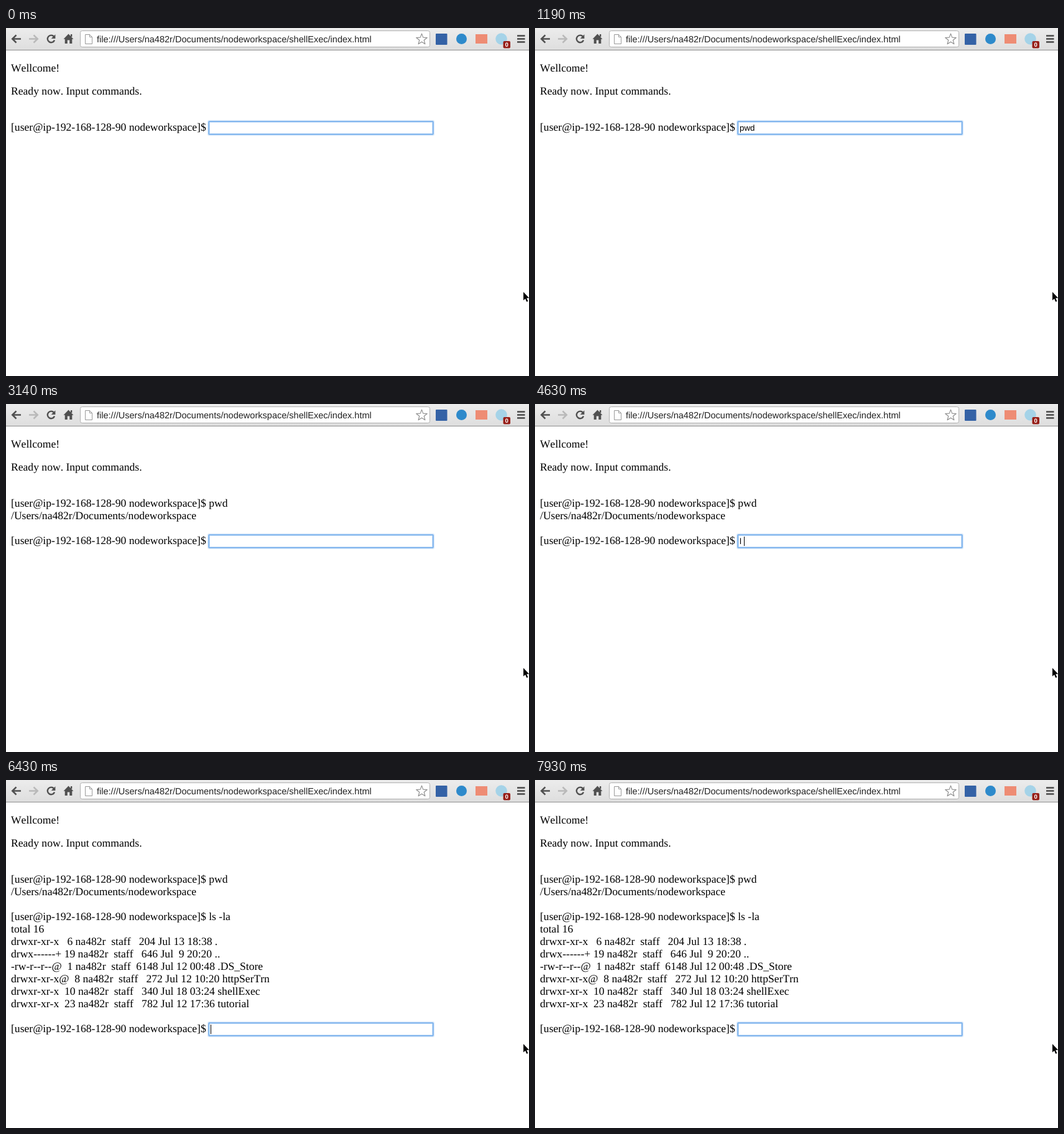
Animation of 841x559 px, one loop 8000 ms. Source, as an HTML page:

```html
<!DOCTYPE html>
<html lang="en">
<head>
<meta charset="utf-8">
<title>Browser shell</title>
<style>
  html, body { margin: 0; width: 100%; height: 100%; overflow: hidden; background: #fff; }
  svg { display: block; }
  text { white-space: pre; font-kerning: none; font-variant-ligatures: none; text-rendering: geometricPrecision; }
  .page { font: 17.6px "Liberation Serif", "Times New Roman", serif; }
  .sans { font-family: "Liberation Sans", Arial, sans-serif; }
</style>
</head>
<body>
<svg width="841" height="559" viewBox="0 0 841 559">
  <defs>
    <linearGradient id="bar" x2="0" y2="1">
      <stop offset="0" stop-color="#ececec"/>
      <stop offset="1" stop-color="#dedede"/>
    </linearGradient>
  </defs>
  <rect width="841" height="559" fill="#fff"/>

  <!-- toolbar -->
  <rect width="841" height="35" fill="url(#bar)"/>
  <rect y="35" width="841" height="1" fill="#8e8e8e"/>
  <rect x="119.5" y="4.5" width="562" height="26" rx="3" fill="#fff" stroke="#b0b0b0"/>
  <g id="arrow" fill="none" stroke="#505050" stroke-width="2.6">
    <path d="M24 17.5H11M16.5 11.3L10.3 17.5L16.5 23.7"/>
  </g>
  <path d="M37 17.5H50M44.5 11.3L50.7 17.5L44.5 23.7" fill="none" stroke="#b9b9b9" stroke-width="2.6"/>
  <path d="M77 13.6A5.8 5.8 0 1 0 78 19.5" fill="none" stroke="#505050" stroke-width="2.4"/>
  <path d="M79.4 10.3V17H72.7Z" fill="#505050"/>
  <path d="M100.5 9.5L108.5 17.8H106.3V25H102.3V19.5H98.7V25H94.7V17.8H92.5ZM104 10H106.3V14H104Z" fill="#505050"/>
  <path d="M127.5 10.5H134.5L138.5 14.5V25.5H127.5ZM134.5 10.5V14.5H138.5" fill="#fff" stroke="#9a9a9a"/>
  <text class="sans" x="146" y="23" font-size="14.54" fill="#222">file:///Users/na482r/Documents/nodeworkspace/shellExec/index.html</text>
  <path id="star" fill="#fff" stroke="#8c8c8c" stroke-width="1.1" stroke-linejoin="round"/>

  <!-- extension buttons -->
  <rect x="691" y="9" width="18.5" height="18" rx="1" fill="#3462a6"/>
  <circle cx="732.5" cy="17.5" r="8.5" fill="#2e8acb"/>
  <rect x="755" y="10" width="19" height="15" fill="#ee8c74"/>
  <circle cx="796.5" cy="17.5" r="9.3" fill="#a5d3e8"/>
  <rect x="799.5" y="21" width="11.5" height="11.5" rx="2" fill="#97201a"/>
  <text class="sans" x="805.2" y="30.3" font-size="9.5" font-weight="bold" fill="#fff" text-anchor="middle">0</text>
  <path d="M822 12.5H834.5M822 17.5H834.5M822 22.5H834.5" stroke="#484848" stroke-width="2.6"/>

  <g id="lines" class="page"></g>

  <g id="field">
    <rect x="326" y="150" width="361" height="21" fill="#fff"/>
    <g id="ring" fill="none" stroke="#5b9fe8"></g>
    <text id="typed" class="sans" x="329" y="165" font-size="13.33"></text>
    <rect id="caret" y="153" width="1" height="15"/>
  </g>

  <path d="M832 424V437.5L835 434.7L837.2 439.8L839.4 438.9L837.2 433.8H841.4Z" stroke="#fff" stroke-width="1.6" paint-order="stroke"/>
</svg>
<script>
const LOOP = 8000;
const PROMPT = "[user@ip-192-168-128-90 nodeworkspace]$ ";
const INTRO = [[70, "Wellcome!"], [107, "Ready now. Input commands."]];
const SESSIONS = [
  [PROMPT + "pwd", "/Users/na482r/Documents/nodeworkspace", ""],
  [PROMPT + "ls -la", "total 16",
    "drwxr-xr-x   6 na482r  staff   204 Jul 13 18:38 .",
    "drwx------+ 19 na482r  staff   646 Jul  9 20:20 ..",
    "-rw-r--r--@  1 na482r  staff  6148 Jul 12 00:48 .DS_Store",
    "drwxr-xr-x@  8 na482r  staff   272 Jul 12 10:20 httpSerTrn",
    "drwxr-xr-x  10 na482r  staff   340 Jul 18 03:24 shellExec",
    "drwxr-xr-x  23 na482r  staff   782 Jul 12 17:36 tutorial", ""]
];
// start time, finished commands, typed text, caret shown
const STEPS = [
  [0, 0, "", 0], [300, 0, "p", 1], [440, 0, "pw", 1], [590, 0, "pwd", 1], [1190, 0, "pwd", 0],
  [1640, 1, "", 1], [2240, 1, "", 0], [2690, 1, "", 1], [3140, 1, "", 0],
  [3580, 1, "l", 1], [3880, 1, "l ", 1], [4180, 1, "l -", 1], [4630, 1, "l ", 1], [4780, 1, "l", 1],
  [5080, 1, "ls", 1], [5230, 1, "ls ", 1], [5530, 1, "ls -", 1], [5830, 1, "ls -l", 1], [5980, 1, "ls -la", 1],
  [6430, 2, "", 1], [6880, 2, "", 0], [7480, 2, "", 1], [7930, 2, "", 0]
];
// the caret moves by whole pixels
const ADVANCE = { p: 8, w: 9, d: 8, l: 3, s: 6, a: 7, " ": 4, "-": 5 };

const $ = id => document.getElementById(id);

function add(parent, tag, attrs, text = "") {
  const el = document.createElementNS("http://www.w3.org/2000/svg", tag);
  for (const key in attrs) el.setAttribute(key, attrs[key]);
  el.textContent = text;
  parent.append(el);
}

function drawRing() {
  [0.04, 0.2, 0.62, 0.85, 0.32].forEach((opacity, i) => {
    const out = 2.5 - i;
    add($("ring"), "rect", {
      x: 326 - out, y: 150 - out, width: 361 + 2 * out, height: 21 + 2 * out,
      rx: Math.max(0, out + 0.5), "stroke-opacity": opacity
    });
  });
}

function drawStar() {
  const points = Array.from({ length: 10 }, (_, i) => {
    const r = i % 2 ? 3.9 : 9.2, a = (i / 5 - 0.5) * Math.PI;
    return (668.5 + r * Math.cos(a)).toFixed(2) + " " + (18.3 + r * Math.sin(a)).toFixed(2);
  });
  $("star").setAttribute("d", "M" + points.join("L") + "Z");
}

function drawLines(done) {
  const log = [...SESSIONS.slice(0, done).flat(), PROMPT];
  const rows = [...INTRO, ...log.map((line, i) => [165 + 20 * i, line])];
  $("lines").replaceChildren();
  rows.forEach(([y, line]) => add($("lines"), "text", { x: 8, y }, line));
  $("field").setAttribute("transform", `translate(0 ${20 * (log.length - 1)})`);
}

let shown;
function render(time) {
  const step = STEPS.findLast(s => s[0] <= time % LOOP);
  if (step === shown) return;
  const [, done, typed, caret] = shown = step;
  drawLines(done);
  $("typed").textContent = typed;
  $("caret").setAttribute("x", [...typed].reduce((x, c) => x + ADVANCE[c], 329));
  $("caret").setAttribute("visibility", caret ? "visible" : "hidden");
}

drawRing();
drawStar();
const start = performance.now();
function tick() {
  render(performance.now() - start);
  requestAnimationFrame(tick);
}
tick();
</script>
</body>
</html>
```
